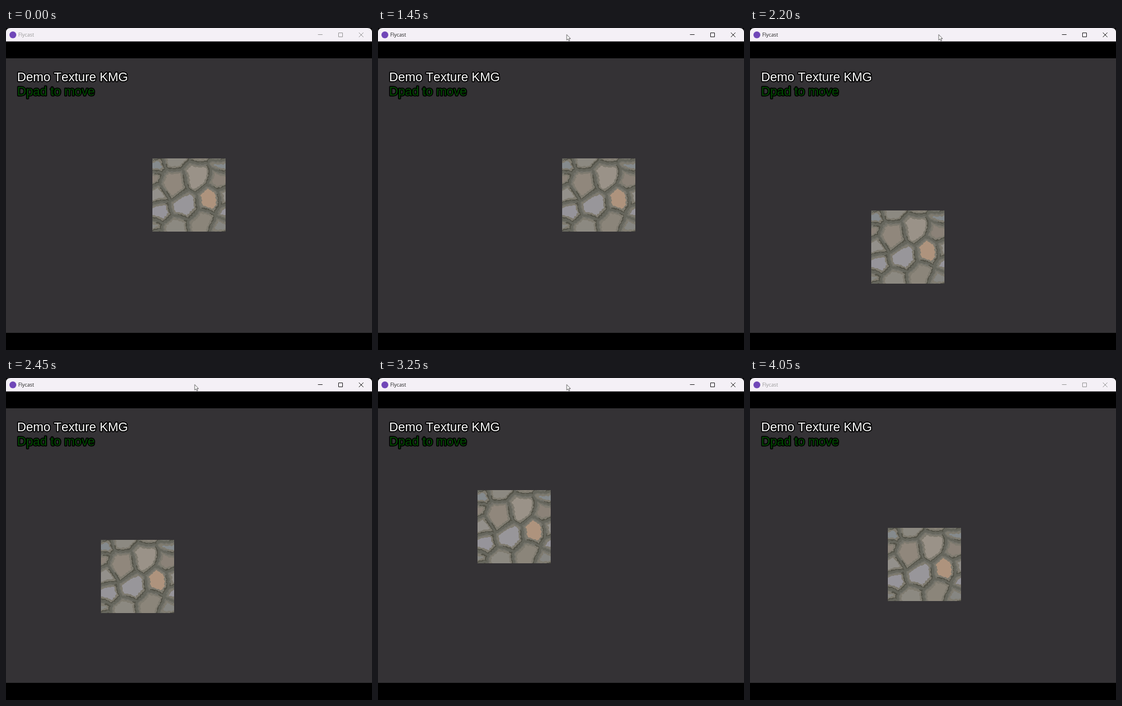
These frames come from a looping animation (640 by 563 pixels, 5000 ms). An HTML page with a canvas:

```html
<!DOCTYPE html>
<html lang="en">
<head>
<meta charset="utf-8">
<title>Texture demo</title>
<style>
  html, body { margin: 0; width: 100%; height: 100%; overflow: hidden; background: #000; }
  svg { display: block; }
  #tile { position: absolute; left: 0; top: 0; }
  #bar { fill: #999; stroke: #999; }
  #bar.active { fill: #222; stroke: #222; }
  #bar text { font: 8.8px "Open Sans", sans-serif; stroke: none; }
  .game {
    font: 21.8px "Liberation Sans", Arial, sans-serif; font-kerning: none;
    stroke: #000; stroke-width: 3.5; stroke-linejoin: round; paint-order: stroke;
  }
</style>
</head>
<body>
<svg width="640" height="563" viewBox="0 0 640 563">
  <path d="M0 23.5V8Q0 0 8 0H632Q640 0 640 8V23.5z" fill="#f4f0f6"/>
  <circle cx="12" cy="12" r="6" fill="#7047b8"/>
  <g id="bar">
    <text x="21.5" y="15">Flycast</text>
    <path d="M545.5 11.5h8M581.5 8.5h7v7h-7zM617 8l8 8M625 8l-8 8" fill="none"/>
  </g>
  <rect y="53" width="640" height="480" fill="#343235"/>
  <text class="game" x="19.5" y="93" fill="#fff">Demo Texture KMG</text>
  <text class="game" x="19.5" y="118" fill="#004a00">Dpad to move</text>
  <path id="cursor" d="M330 11.5v9.7l2.2-2 1.6 3.4 1.5-.7-1.5-3.3h2.9z" fill="#fff" stroke="#444" stroke-width=".8"/>
</svg>
<canvas id="tile" width="128" height="128"></canvas>

<script>
const $ = id => document.getElementById(id);
const SIZE = 128, STEP = 50, LOOP = 5000;

// Stone centres and face colours; the texture wraps around at its edges
const stones = [
  [78, 30, '#9a9288'], [36, 44, '#90877c'], [102, 71, '#ae937d'], [57, 84, '#98969a'],
  [8, 93, '#96949a'], [85, 112, '#8b857a'], [40, 122, '#8c8981'], [120, 37, '#8b8278'],
  [126, 8, '#858a8d'], [2, 64, '#93908b'], [124, 122, '#868682']
];
const wrap = d => (d + SIZE * 1.5) % SIZE - SIZE / 2;

// Cobblestones: cells around the nearest centre, shaded by distance to the cell edge
function stoneColor(px, py) {
  const x = px + 1.5 * Math.sin(py / 6), y = py + 1.5 * Math.sin(px / 7);
  const cells = stones.map(([sx, sy, face]) => {
    const dx = wrap(x - sx), dy = wrap(y - sy);
    return { dx, dy, face, d2: dx * dx + dy * dy };
  }).sort((a, b) => a.d2 - b.d2);
  const [near, ...others] = cells;
  const gap = Math.min(...others.map(o =>
    (o.d2 - near.d2) / 2 / Math.hypot(o.dx - near.dx, o.dy - near.dy)));
  const edge = gap + .8 * Math.sin(px * .7) * Math.sin(py * .8);
  if (edge < 2) return '#66665d';
  if (edge < 4) return near.dx + near.dy > 0 ? '#55544a' : '#73726a';
  if (edge < 7) return '#7f7b70';
  return near.face;
}

function paintTile() {
  const ctx = $('tile').getContext('2d');
  for (let y = 0; y < SIZE; y++) {
    for (let x = 0; x < SIZE; x++) {
      ctx.fillStyle = stoneColor(x, y);
      ctx.fillRect(x, y, 1, 1);
    }
  }
}

// Held directions: from, to (ms) and the distance covered
const presses = [
  { from: 900, to: 1450, dx: 66, dy: 0 },
  { from: 1550, to: 2100, dx: -91, dy: 91 },
  { from: 2100, to: 2800, dx: -131, dy: 0 },
  { from: 2260, to: 2950, dx: 0, dy: -130 },
  { from: 2900, to: 3200, dx: 67, dy: 0 },
  { from: 3200, to: 3750, dx: 74, dy: 73 }
];

function tilePosition(t) {
  let x = 256, y = 228;
  for (const { from, to, dx, dy } of presses) {
    const k = Math.min(1, Math.max(0, (t - from) / (to - from)));
    x += dx * k;
    y += dy * k;
  }
  return [Math.round(x), Math.round(y)];
}

const start = performance.now();

function draw() {
  const time = Math.max(0, performance.now() - start) % LOOP;
  const t = Math.floor(time / STEP) * STEP;
  const [x, y] = tilePosition(t);
  $('tile').style.transform = `translate(${x}px, ${y}px)`;
  $('bar').classList.toggle('active', t >= 350 && t < 3900);
  $('cursor').style.display = t >= 250 && t < 4050 ? '' : 'none';
  requestAnimationFrame(draw);
}

paintTile();
draw();
</script>
</body>
</html>
```
